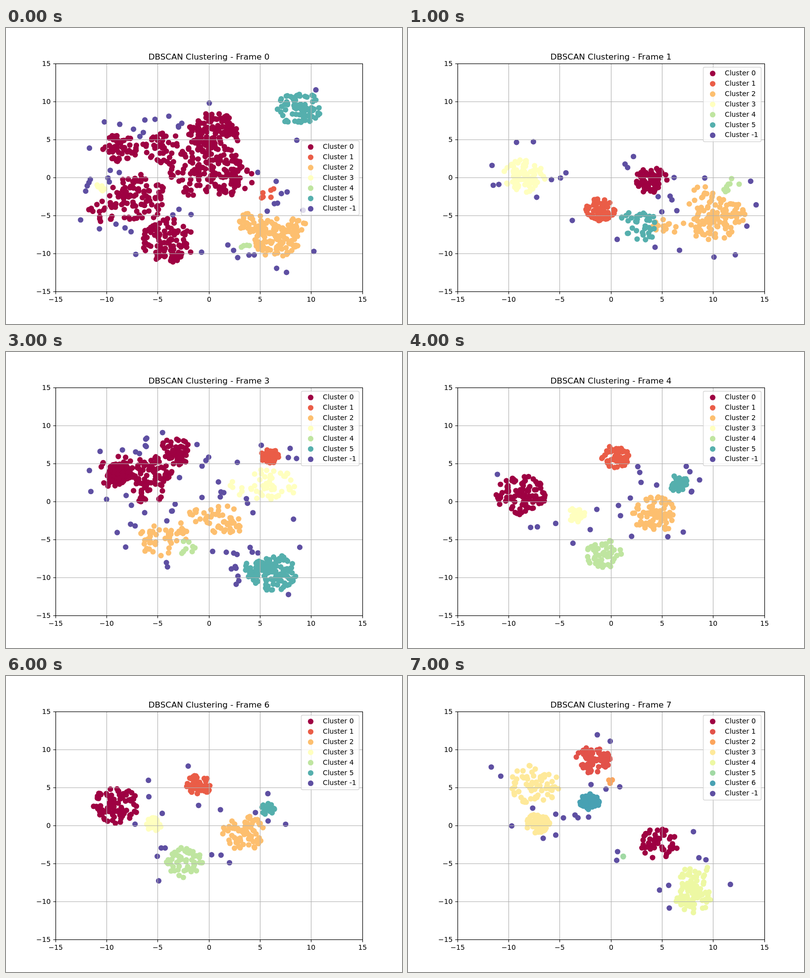
An HTML page with a canvas that plays this animation: 800x600 px, repeating every 8 s.

```html
<!DOCTYPE html>
<html lang="en">
<head>
<meta charset="utf-8">
<title>DBSCAN Clustering</title>
<style>
  html, body { margin: 0; width: 100%; height: 100%; overflow: hidden; background: #fff; }
  canvas { display: block; }
</style>
</head>
<body>
<canvas id="stage" width="800" height="600"></canvas>
<script>
const ctx = document.getElementById('stage').getContext('2d');
const HOLD = 1000;
const LEFT = 100, TOP = 72, WIDTH = 620, HEIGHT = 462;
const ASPECT = 0.8;
const SPECTRAL = ['#9e0142', '#d53e4f', '#f46d43', '#fdae61', '#fee08b', '#ffffbf',
                  '#e6f598', '#abdda4', '#66c2a5', '#3288bd', '#5e4fa2'];
const plots = [];

// Samples the colour map at t in 0..1
function spectral(t) {
  const i = Math.min(9, Math.floor(t * 10)), k = t * 10 - i;
  const channel = (hex, c) => parseInt(hex.substr(1 + c * 2, 2), 16);
  const mix = c => Math.round(channel(SPECTRAL[i], c) * (1 - k) + channel(SPECTRAL[i + 1], c) * k);
  return `rgb(${[0, 1, 2].map(mix)})`;
}

function seededRandom(seed) {
  return () => {
    seed = (seed + 0x6D2B79F5) | 0;
    let t = Math.imul(seed ^ (seed >>> 15), 1 | seed);
    t = (t + Math.imul(t ^ (t >>> 7), 61 | t)) ^ t;
    return ((t ^ (t >>> 14)) >>> 0) / 4294967296;
  };
}

// Every cluster is a list of blobs [x, y, radius, count]; noise lies around the blobs
function addPlot(noiseCount, ...clusters) {
  const random = seededRandom(plots.length * 101 + 7);
  const around = ([x, y, radius], r) => {
    const angle = random() * 2 * Math.PI;
    return [x + radius * r * Math.cos(angle), y + ASPECT * radius * r * Math.sin(angle)];
  };
  const groups = clusters.map(blobs => blobs.flatMap(blob =>
    Array.from({ length: blob[3] }, () => around(blob, random() ** 0.6))));

  const blobs = clusters.flat(), noise = [];
  const isClear = ([x, y]) => blobs.every(([bx, by, radius]) =>
    Math.hypot(x - bx, (y - by) / ASPECT) > radius + 9);
  while (noise.length < noiseCount) {
    const blob = blobs[Math.floor(random() * blobs.length)];
    const point = around([blob[0], blob[1], blob[2] + 12], 1 + random() * 0.6);
    if (isClear(point)) noise.push(point);
  }
  plots.push([...groups, noise]);
}

addPlot(49,
  [[420, 213, 52, 120], [230, 243, 36, 60], [318, 243, 42, 45], [400, 285, 75, 130],
   [460, 310, 42, 40], [268, 345, 60, 95], [195, 370, 28, 18], [325, 432, 58, 105]],
  [[522, 333, 22, 6]],
  [[545, 422, 52, 115], [495, 395, 28, 28], [590, 398, 18, 12]],
  [[188, 325, 12, 8]],
  [[484, 440, 11, 4]],
  [[592, 163, 44, 82]]);

addPlot(28,
  [[492, 309, 33, 68]],
  [[388, 369, 30, 68]],
  [[612, 385, 58, 90], [595, 338, 22, 12], [652, 378, 30, 24], [520, 408, 28, 16]],
  [[235, 299, 43, 76]],
  [[648, 323, 24, 8]],
  [[470, 397, 42, 40]]);

addPlot(40,
  [[315, 403, 42, 70], [292, 447, 45, 95], [360, 400, 38, 50], [442, 395, 48, 120], [425, 432, 55, 80]],
  [[243, 392, 15, 31]],
  [[393, 290, 58, 120], [512, 278, 35, 62], [455, 290, 20, 12]],
  [[271, 222, 26, 62], [220, 212, 26, 20], [235, 250, 32, 36]],
  [[252, 330, 42, 70], [300, 325, 16, 8]],
  [[525, 384, 21, 47]],
  [[544, 157, 20, 59]],
  [[410, 215, 17, 48]]);

addPlot(59,
  [[228, 246, 26, 95], [225, 243, 42, 30], [295, 245, 42, 62], [338, 203, 36, 58], [288, 282, 32, 26]],
  [[533, 211, 18, 59]],
  [[445, 340, 42, 36], [305, 382, 40, 34], [350, 365, 24, 14], [395, 328, 26, 13]],
  [[540, 270, 48, 45], [470, 273, 22, 6]],
  [[372, 393, 26, 8]],
  [[540, 447, 46, 105], [505, 440, 26, 25]]);

addPlot(22,
  [[228, 290, 50, 100]],
  [[420, 212, 30, 60]],
  [[500, 330, 46, 80]],
  [[340, 330, 18, 30]],
  [[398, 410, 38, 55]],
  [[545, 266, 20, 35]]);

addPlot(13,
  [[255, 290, 40, 54], [327, 297, 26, 70], [328, 298, 50, 28], [425, 365, 42, 86],
   [370, 358, 32, 30], [405, 325, 22, 12], [455, 375, 22, 14]],
  [[413, 211, 32, 65], [432, 238, 22, 48]],
  [[289, 215, 10, 31]],
  [[561, 355, 9, 20]]);

addPlot(18,
  [[222, 262, 46, 85]],
  [[388, 222, 26, 50]],
  [[480, 318, 44, 75]],
  [[300, 300, 18, 28]],
  [[360, 378, 38, 55]],
  [[530, 270, 15, 25]]);

addPlot(25,
  [[508, 340, 40, 51]],
  [[373, 170, 36, 70]],
  [[411, 214, 7, 3]],
  [[262, 299, 24, 80], [255, 220, 50, 66]],
  [[575, 450, 38, 58], [585, 412, 36, 32]],
  [[435, 366, 1, 3]],
  [[367, 255, 20, 56]]);

function dot(x, y, color) {
  ctx.fillStyle = color;
  ctx.beginPath();
  ctx.arc(x, y, 5.6, 0, 2 * Math.PI);
  ctx.fill();
}

function line(x1, y1, x2, y2, color) {
  ctx.strokeStyle = color;
  ctx.lineWidth = 1.11;
  ctx.beginPath();
  ctx.moveTo(x1 + 0.5, y1 + 0.5);
  ctx.lineTo(x2 + 0.5, y2 + 0.5);
  ctx.stroke();
}

function text(str, x, y, align, size = 13.89) {
  ctx.fillStyle = '#000';
  ctx.font = `${size}px "DejaVu Sans", sans-serif`;
  ctx.textAlign = align;
  ctx.fillText(str, x, y);
}

function drawAxes() {
  const right = LEFT + WIDTH, bottom = TOP + HEIGHT;
  const label = v => String(v).replace('-', '\u2212');
  for (let i = 0; i <= 6; i++) {
    const x = Math.floor(LEFT + WIDTH * i / 6), y = TOP + HEIGHT * i / 6;
    line(x, TOP, x, bottom, '#b0b0b0');
    line(LEFT, y, right, y, '#b0b0b0');
    line(x, bottom, x, bottom + 5, '#000');
    line(LEFT - 5, y, LEFT, y, '#000');
    text(label(i * 5 - 15), x + 0.3, 555, 'center');
    text(label(15 - i * 5), 90.3, y + 5.3, 'right');
  }
  ctx.strokeStyle = '#000';
  ctx.strokeRect(LEFT + 0.5, TOP + 0.5, WIDTH, HEIGHT);
}

function drawLegend(top, colors) {
  ctx.beginPath();
  ctx.roundRect(596.5, top + 0.5, 117, 4.4 + 20.95 * colors.length, 2.8);
  ctx.fillStyle = 'rgba(255,255,255,0.8)';
  ctx.fill();
  ctx.strokeStyle = 'rgba(204,204,204,0.8)';
  ctx.lineWidth = 1.39;
  ctx.stroke();
  colors.forEach((color, i) => {
    const y = top + 13.2 + 20.87 * i;
    dot(615.5, y, color);
    text(`Cluster ${i === colors.length - 1 ? -1 : i}`, 640, y + 4, 'left');
  });
}

function drawPlot(index) {
  const groups = plots[index];
  const colors = groups.map((_, i) => spectral(i / (groups.length - 1)));
  ctx.fillStyle = '#fff';
  ctx.fillRect(0, 0, 800, 600);
  ctx.save();
  ctx.beginPath();
  ctx.rect(LEFT, TOP, WIDTH, HEIGHT);
  ctx.clip();
  groups.forEach((points, i) => points.forEach(([x, y]) => dot(x, y, colors[i])));
  ctx.restore();
  drawAxes();
  // The first plot has points in the top right corner, so its legend sits lower
  drawLegend(index === 0 ? 228 : 79, colors);
  text(`DBSCAN Clustering - Frame ${index}`, 410, 64, 'center', 16.67);
}

let shown = -1;
const start = performance.now();
function tick() {
  const index = Math.floor((performance.now() - start) / HOLD) % plots.length;
  if (index !== shown) drawPlot(shown = index);
  requestAnimationFrame(tick);
}
tick();
</script>
</body>
</html>
```
